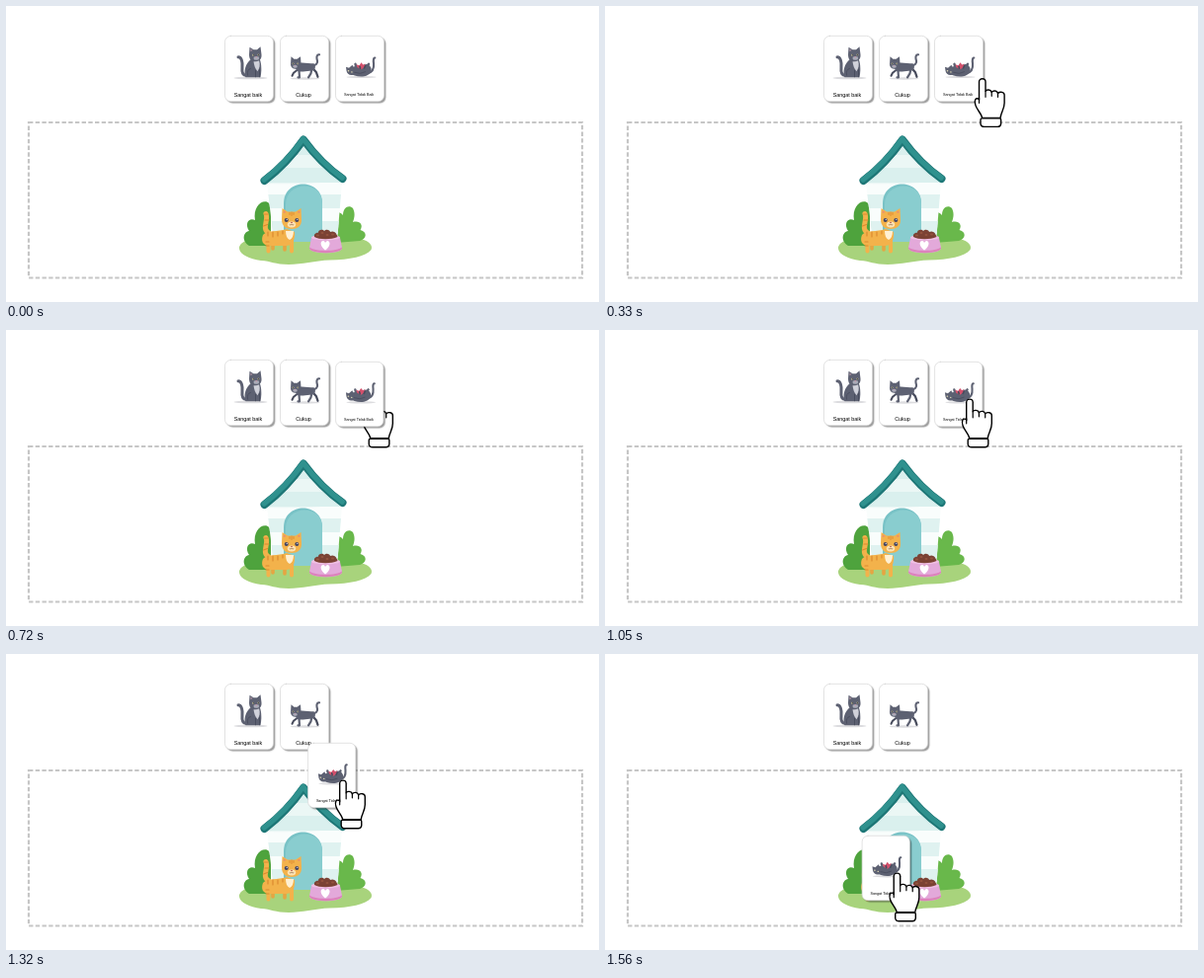
Recreate the animation shown at these times as an HTML page with a canvas. Size 600x300 px, loop 1.95 s.

```html
<!DOCTYPE html>
<html lang="id">
<head>
<meta charset="utf-8">
<title>Seret kartu kucing</title>
<style>
html, body { margin: 0; width: 100%; height: 100%; overflow: hidden; background: #fff; }
canvas { display: block; width: 600px; height: 300px; }
</style>
</head>
<body>
<canvas id="stage" width="600" height="300"></canvas>
<script>
const ctx = document.getElementById('stage').getContext('2d');
const LOOP = 1950, STEP = 30;
const REST = { x: 369, y: 69.8 };   // fingertip when the hand has arrived
const LIFTED = { x: 333.6, y: 32.3, scale: .985 };
const FUR = '#5d6172', FUR_DARK = '#474b5c', ORANGE = '#f3b24b', STRIPE = '#dc8a30';

function fill(d, color) {
  ctx.fillStyle = color;
  ctx.fill(new Path2D(d));
}

function line(d, color, width) {
  ctx.strokeStyle = color;
  ctx.lineWidth = width;
  ctx.lineCap = ctx.lineJoin = 'round';
  ctx.stroke(new Path2D(d));
}

function oval(x, y, rx, ry, color) {
  ctx.fillStyle = color;
  ctx.beginPath();
  ctx.ellipse(x, y, rx, ry, 0, 0, Math.PI * 2);
  ctx.fill();
}

function at(x, y, draw) {
  ctx.save();
  ctx.translate(x, y);
  draw();
  ctx.restore();
}

// Cat drawings use coordinates local to their card.
function sittingCat() {
  oval(26, 42.6, 17, 1.4, '#dcdcdf');
  line('M23 40C18 41 17 37 17.5 32C18 27 17 21.5 13.5 21.5', FUR, 3);
  fill('M26 24C21 28 18.5 36 21 42H36C37 37 37.5 29 35 23Z', FUR);
  fill('M29 26L34.5 25C36 29 35 33 33 36C30.5 33 29.5 30 29 26Z', '#d0d1da');
  line('M31 35V41.5M35 34V41.5', FUR_DARK, .9);
  line('M23 40Q22 34 26 33', FUR_DARK, .8);
  fill('M24.5 19L25 11.5L29 14H32.5L36 11L37 19C37.5 24 34 26 30.5 26C27 26 24.5 24 24.5 19Z', FUR);
  fill('M25.8 16L26 13L28.2 14.8Z', '#a58e9d');
  oval(31.8, 22.6, 2.8, 1.9, '#a9abb8');
  oval(28.5, 19.4, .9, 1, '#e8e3b8');
  oval(33.9, 19.2, .9, 1, '#e8e3b8');
  oval(28.7, 19.4, .5, .9, '#222');
  oval(33.8, 19.2, .5, .9, '#222');
  oval(31.8, 21.5, .7, .5, '#d7889b');
}

function walkingCat() {
  oval(25, 43.2, 15, 1.2, '#dcdcdf');
  line('M34 30C38 29 38 26 37 23C36.5 20 38 18.8 39.5 19', FUR, 2.1);
  line('M33 33L36.5 37L38 41.5', FUR_DARK, 2.2);
  line('M18 34L13.5 37.5L12 40.5', FUR_DARK, 2);
  fill('M16 28C21 26 29 28 34 28C37 31 35 36 31 35.5C27 35 23 37 18 36C15 34 15 31 16 28Z', FUR);
  line('M32 33L31 38L28.5 42', FUR, 2.2);
  line('M19 35L19.5 42H18', FUR, 2.2);
  fill('M10.5 29L11 21L14 23.5H17L20.5 21L21 28C20.5 32 18 33.5 15.5 33.5C12.5 33.5 10.5 31.5 10.5 29Z', FUR);
  oval(15, 31, 2.3, 1.5, '#a9abb8');
  oval(13, 28, .9, .9, '#e8e3b8');
  oval(17.7, 28, .9, .9, '#e8e3b8');
  oval(13.1, 28, .45, .8, '#222');
  oval(17.6, 28, .45, .8, '#222');
  oval(15, 30, .6, .45, '#d7889b');
}

function lyingCat() {
  oval(26, 41.7, 15, 1.1, '#dcdcdf');
  line('M32 38C37 37 39 33 38.5 28C38 24 38.5 22 39.8 22.3', FUR, 2.1);
  fill('M16 32C20 30 23 32 26 31C29 28 33 28 35 31C38 35 35 40 29 41C23 42 18 40 14 38Z', FUR);
  fill('M10.5 31.5L13.5 32.5L17 29.5L18.5 33C20 35 19.5 38 17.5 39.5C14.5 40.5 11.5 38.5 11 35.5Z', FUR);
  oval(13, 35.4, .8, .7, '#e8e3b8');
  oval(16.4, 36.6, .8, .7, '#e8e3b8');
  line('M21 32L20 28.5M31 32L33.5 28.5', FUR, 2.4);
  fill('M21 29L24 30L26 27L28 29.5L30 28L29 32L26 34L22 32Z', '#d4506c');
  line('M25 33L24.5 31M29 32.5L30 30.5', FUR_DARK, 1.6);
  line('M19 37Q25 39.5 30 36.5', FUR_DARK, .8);
}

const CARDS = [
  { x: 221.5, draw: sittingCat, label: 'Sangat baik', size: 5.4, tx: 23.5, ty: 61.3 },
  { x: 277.5, draw: walkingCat, label: 'Cukup', size: 5.4, tx: 23.5, ty: 61.3 },
  { x: 333.5, draw: lyingCat, label: 'Sangat Tidak Baik', size: 3.75, tx: 23.6, ty: 60.8 }
];

function drawCard(card, x = card.x, y = 30.3, scale = 1) {
  at(x, y, () => {
    ctx.scale(scale, scale);
    ctx.save();
    ctx.shadowColor = 'rgba(0,0,0,.4)';
    ctx.shadowOffsetX = ctx.shadowOffsetY = 1.8;
    ctx.shadowBlur = 1.2;
    ctx.fillStyle = '#fff';
    ctx.beginPath();
    ctx.roundRect(0, 0, 49, 66.5, 6);
    ctx.fill();
    ctx.restore();
    ctx.strokeStyle = '#d6d6d6';
    ctx.lineWidth = .7;
    ctx.stroke();
    card.draw();
    ctx.font = `${card.size}px "Liberation Sans", sans-serif`;
    ctx.textAlign = 'center';
    ctx.fillStyle = '#000';
    ctx.fillText(card.label, card.tx, card.ty);
  });
}

function drawGarden() {
  fill('M236 246C236 238 250 234 266 235C290 231 318 235 340 234C360 233 373 240 369.5 247C364 254 348 257 328 257.5C312 258 300 262 286 262C272 262 268 258.5 258 258C246 256 237 252 236 246Z', '#a8d37c');
  fill('M246 243C238 238 240 229 246 228C241 220 246 214 252 217C250 205 257 197 264 198.5C270 201 269 210 268 217V243Z', '#4ea33d');
  fill('M333.5 240V210C337 207 340 211 341 212C341 204 347 201 351 205C354 211 352 216 351 219C358 217 362 222 358.5 227C366 229 365 236 358 238Z', '#69b84b');
}

function drawHouse() {
  const wall = new Path2D('M264 179L301 141L340 178L335 239H271Z');
  ctx.fillStyle = '#f9fdfc';
  ctx.fill(wall);
  ctx.save();
  ctx.clip(wall);
  ctx.fillStyle = '#dff2f0';
  for (const [y, h] of [[138, 13], [164, 15], [191, 14], [218, 13]]) ctx.fillRect(260, y, 84, h);
  ctx.restore();
  fill('M264 180Q289 161 301 143L343 179H320Q295 181 264 180Z', 'rgba(208,235,232,.35)');
  fill('M281 239V200C281 174 320 174 320 200V239Z', '#78c2c6');
  fill('M283 239V201C283 177 320 176 320 200V239Z', '#89cdcf');
  const roof = 'M261.5 177Q284 160 301 135.5Q319 160 340.5 175';
  line(roof, '#1e7777', 8);
  at(-.3, -1, () => line(roof, '#2f918e', 5.2));
}

function drawGingerCat() {
  line('M266 230C258 226 266 217 263 210.5', ORANGE, 5);
  line('M261.5 211H265M262 217H266M260.5 223L264.5 221.5', STRIPE, 1.2);
  line('M270 240V246M282 240V247', '#e5a542', 3.6);
  fill('M260 232C264 227 275 229 284 226L292 229C292.5 236 291 242 284 243H267C259 243 258 237 260 232Z', ORANGE);
  line('M265.5 240V248.5M289 238V248.5', ORANGE, 4);
  line('M265 229V233M270 229V234M275 229V233M280 228V231M263 239H266M263 243H266', STRIPE, 1.2);
  fill('M283 228H291Q291 235 287 237Q283 235 283 228Z', '#fff0d3');
  fill('M279 216L279.5 205L285 208.5H293L298.5 205L299 217C299 223 295 226 289 226C283 226 279 223 279 216Z', ORANGE);
  fill('M280.7 210L281 207.5L283.5 209ZM294.5 209L297.3 207.5L297.2 210Z', '#e98b72');
  line('M287 209.5V211.5M289 209V212.5M291 209.5V211.5', STRIPE, .9);
  oval(289, 221.5, 4.2, 3, '#fde3b4');
  for (const x of [283.7, 294.3]) {
    oval(x, 217, 2, 2, '#434463');
    oval(x + .5, 216.3, .6, .6, '#fff');
  }
  oval(289, 219.5, 1, .7, '#bd6358');
  line('M287 221.7Q288 222.7 289 221.3Q290 222.7 291 221.7', '#795238', .6);
}

function drawBowl() {
  fill('M309 235H338L340 245C341 252 306 252 307 245Z', '#e3a9da');
  fill('M307 244.5C312 249 335 249 340 244.5C342 252 305 252 307 244.5Z', '#dc82bb');
  oval(323.5, 234.5, 14.5, 3, '#f0c0e4');
  fill('M312 234C311 230 315 230 316 229.5C316 226 321 226 322 228C324 225.5 328 227 328 229C332 227 335 231 335.5 234C329 237 317 237 312 234Z', '#7b4234');
  for (const [x, y] of [[315.5, 232.5], [320, 230], [325, 232], [330.5, 231.5]]) oval(x, y, 1.5, 1.1, '#95543f');
  fill('M323 247.5C317 243 318 238 321 238Q322.5 238 323 240Q324 238 325.5 238C329 239 328 244 323 247.5Z', '#fff');
}

function drawZone() {
  ctx.strokeStyle = '#c6c6c6';
  ctx.lineWidth = 2.2;
  ctx.lineCap = 'butt';
  ctx.lineJoin = 'miter';
  ctx.setLineDash([4.4, 2.3]);
  ctx.strokeRect(23, 118, 560, 157.5);
  ctx.setLineDash([]);
}

function drawHand(x, y) {
  at(x, y, () => {
    const palm = 'M-3.3 22V3.5C-3.3-.7 3.2-.7 3.2 3.5V13C4 11 8.5 11 9.4 14C11 12 14.5 12 15.7 15C18 13 22.3 13.5 22.3 17V25C22.3 31 19 34 18.2 40H-.2C-.7 36-5.5 32-7 27C-8.5 22-7 19-3.3 21Z';
    fill(palm, '#fff');
    line(palm, '#000', 1.4);
    line('M3.2 13V19M9.4 14V18M15.7 15V19M-3.3 20V25', '#000', 1.2);
    const cuff = 'M-.5 40.5H17.5Q18.8 40.5 18.8 42V46Q18.5 49 15.5 49H2Q-1.5 49-1.8 46V42Q-1.8 40.5-.5 40.5Z';
    fill(cuff, '#fff');
    line(cuff, '#000', 1.4);
  });
}

const clamp = u => Math.min(1, Math.max(0, u));
const easeInOutQuint = u => u < .5 ? 16 * u ** 5 : 1 - 16 * (1 - u) ** 5;

function drawScene(t) {
  ctx.fillStyle = '#fff';
  ctx.fillRect(0, 0, 600, 300);
  drawZone();
  drawGarden();
  drawHouse();
  drawGingerCat();
  drawBowl();
  drawCard(CARDS[0]);
  drawCard(CARDS[1]);

  const away = (1 - clamp((t - 30) / 540)) ** 3.5;
  const drag = easeInOutQuint(clamp((t - 1050) / 570));
  const dx = -73.5 * drag, dy = 152 * drag;
  const hand = () => {
    if (t >= 30) drawHand(REST.x + 219 * away + dx, REST.y + 61 * away + dy);
  };

  // The lifted card covers the hand until the drag starts.
  if (t >= 720 && t < 1050) hand();
  if (t < 720) drawCard(CARDS[2]);
  else drawCard(CARDS[2], LIFTED.x + dx, LIFTED.y + dy, LIFTED.scale);
  if (t < 720 || t >= 1050) hand();
}

const start = performance.now();
function tick() {
  const t = (performance.now() - start) % LOOP;
  drawScene(Math.floor(t / STEP) * STEP);
  requestAnimationFrame(tick);
}
tick();
</script>
</body>
</html>
```
